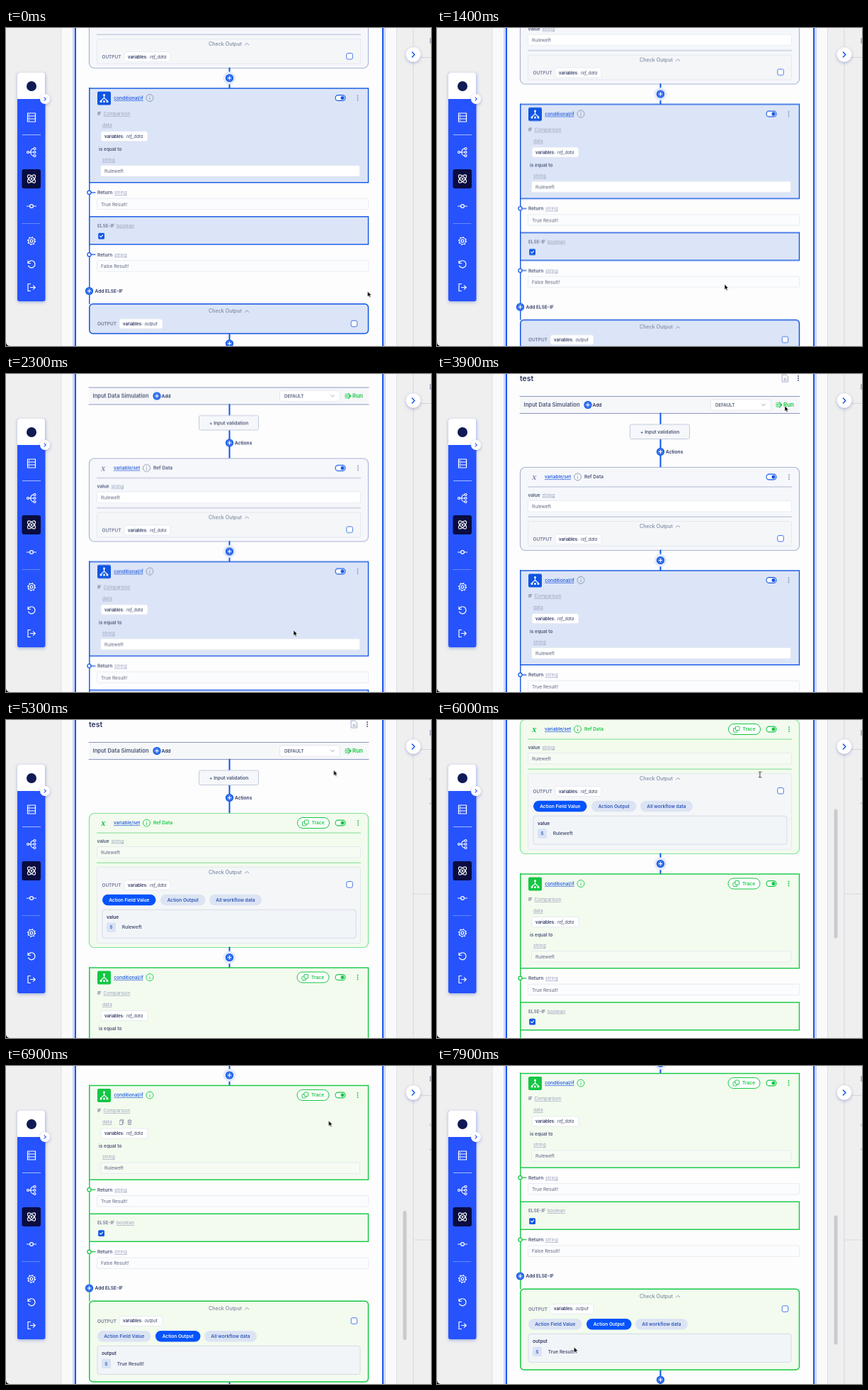
Write an HTML page that moves like this. It is 600x448 px and loops after 8 s.

```html
<!DOCTYPE html>
<html lang="en">
<head>
<meta charset="utf-8">
<title>Workflow run</title>
<style>
html, body { margin: 0; width: 100%; height: 100%; overflow: hidden; background: #efeff0; }
svg { display: block; }
text { font: 400 6.6px Inter, Roboto, sans-serif; fill: #5f6782; white-space: pre; }
.bold { font-weight: 600; fill: #4d5678; }
.dark { font-weight: 600; fill: #2b3560; }
.soft { fill: #98a1bd; text-decoration: underline; }
.link { font-weight: 500; fill: #1450dd; text-decoration: underline; }
.caps { font-size: 6.4px; font-weight: 600; fill: #6d7694; }
.head { font-size: 7.1px; font-weight: 500; fill: #7e88a5; }
.key { font-size: 5.9px; font-weight: 600; fill: #2b3560; }
.ref { font-size: 6px; font-style: italic; fill: #3c4568; }
.white { font-weight: 600; fill: #fff; }
.tab { font-weight: 600; fill: #3159b8; }
.main { font-weight: 600; fill: var(--main); }
.run { font-size: 8px; font-weight: 600; fill: #10c83e; }
.mid { text-anchor: middle; }
.line { fill: none; stroke-linecap: round; stroke-linejoin: round; }
.before { --main: #1055e3; --card: #dce5f7; --edge: #aab5d3; --pale: #f5f7fb; --rule: #a9b3cc; --mute: #8792b2; --field: #fff; }
.after { --main: #14c744; --card: #f2fbee; --edge: #82e297; --pale: #f2fbee; --rule: #72d989; --mute: #14c744; --field: #f6fbf4; }

.flow { animation: scroll 8s infinite; }
.before { animation: before 8s step-end infinite; }
.after, .result { animation: after 8s step-end infinite; }
.hover { animation: hover 8s step-end infinite; }
.thumb { animation: thumb 8s infinite, thumbShow 8s step-end infinite; }
.cursor { animation: cursor 8s infinite; }
.arrow { animation: arrow 8s step-end infinite; }
.beam { animation: beam 8s step-end infinite; }

@keyframes scroll {
  0% { transform: translateY(-179.5px); animation-timing-function: step-end; }
  11.25% { transform: translateY(-179.5px); animation-timing-function: steps(5); }
  17.5% { transform: translateY(-157px); animation-timing-function: steps(3); }
  21.25% { transform: translateY(-108px); animation-timing-function: steps(4); }
  26.25% { transform: translateY(-24px); animation-timing-function: steps(2); }
  28.75% { transform: translateY(0); animation-timing-function: steps(3); }
  32.5% { transform: translateY(12.5px); animation-timing-function: step-end; }
  67.5% { transform: translateY(12.5px); animation-timing-function: steps(6); }
  75% { transform: translateY(-119.5px); animation-timing-function: steps(9); }
  86.25% { transform: translateY(-309px); animation-timing-function: steps(5); }
  92.5%, 100% { transform: translateY(-326px); }
}
@keyframes thumb {
  0%, 67.5% { transform: translateY(72px); animation-timing-function: steps(6); }
  75% { transform: translateY(125.5px); animation-timing-function: steps(9); }
  86.25% { transform: translateY(204px); animation-timing-function: steps(5); }
  92.5%, 100% { transform: translateY(210.5px); }
}
@keyframes thumbShow { 0% { opacity: 0; } 68.75%, 100% { opacity: 1; } }
@keyframes before { 0% { visibility: visible; } 55%, 100% { visibility: hidden; } }
@keyframes after { 0% { visibility: hidden; } 55%, 100% { visibility: visible; } }
@keyframes hover { 0% { opacity: 0; } 83.75% { opacity: 1; } 88.75%, 100% { opacity: 0; } }
@keyframes cursor {
  0% { transform: translate(510.5px, 371px); animation-timing-function: steps(3); }
  3.75% { transform: translate(406px, 361px); animation-timing-function: step-end; }
  33.75% { transform: translate(406px, 361px); animation-timing-function: steps(9); }
  45% { transform: translate(491px, 45px); animation-timing-function: step-end; }
  61.25% { transform: translate(491px, 45px); animation-timing-function: steps(5); }
  67.5% { transform: translate(455.5px, 77px); animation-timing-function: step-end; }
  90% { transform: translate(455.5px, 77px); animation-timing-function: steps(7); }
  98.75%, 100% { transform: translate(193.5px, 396px); }
}
@keyframes arrow { 0% { opacity: 1; } 71.25% { opacity: 0; } 78.75%, 100% { opacity: 1; } }
@keyframes beam { 0% { opacity: 0; } 71.25% { opacity: 1; } 78.75%, 100% { opacity: 0; } }
</style>
</head>
<body>
<svg width="600" height="448" viewBox="0 0 600 448">
  <defs>
    <filter id="shade" x="-50%" y="-50%" width="200%" height="200%">
      <feDropShadow dx="0" dy="1.5" stdDeviation="2" flood-color="#3454a8" flood-opacity=".4"/>
    </filter>
  </defs>
  <rect width="600" height="448" fill="#efeff0"/>
  <rect x="78" width="473.5" height="448" fill="#fafafb"/>
  <path d="M78 0V448M551.5 0V448" stroke="#dedfe4"/>
  <rect x="94" width="442" height="448" fill="#ccd8f8"/>
  <rect x="97" width="436" height="448" fill="#1b57e6"/>
  <rect x="99" width="432" height="448" fill="#fdfdfe"/>
  <path d="M575 0V448M575 41.5H600" stroke="#d5d6da"/>
  <path d="M599 14V22" stroke="#777e93"/>
  <g class="result">
    <path d="M575 245H600" stroke="#d9dade"/>
    <path d="M599 81V85M599 116V119" stroke="#b6bac6"/>
  </g>

  <g class="flow" id="flow"></g>

  <rect class="thumb" x="560.5" width="5" height="182" rx="2.5" fill="#c9cacd"/>
  <g filter="url(#shade)"><circle cx="575" cy="37.5" r="10.3" fill="#fff"/></g>
  <path class="line" d="M573.4 34L576.8 37.5L573.4 41" stroke="#1557e0" stroke-width="1.5"/>

  <g filter="url(#shade)">
    <rect x="16" y="63" width="39.5" height="322" rx="3" fill="#2853fd"/>
    <path d="M16 100V66Q16 63 19 63H52.5Q55.5 63 55.5 66V100Z" fill="#fff"/>
  </g>
  <circle cx="36" cy="82" r="7" fill="#101a55"/>
  <path d="M23 150.5H49" stroke="#a9bbff"/>
  <path d="M23 275.5H49" stroke="#a9bbff" stroke-dasharray="1 1"/>
  <rect x="22.5" y="199" width="26.5" height="27" rx="3" fill="#090c3f"/>
  <g filter="url(#shade)"><circle cx="55" cy="100" r="7" fill="#fff"/></g>
  <path class="line" d="M54 97.8L56.3 100L54 102.2" stroke="#2853fd" stroke-width="1.1"/>
  <g class="line" stroke="#fff" stroke-width="1.2">
    <path d="M30.5 120H41.5V124H30.5ZM30.5 124H41.5V128H30.5ZM30.5 128H41.5V132H30.5ZM32.5 122H33M32.5 126H33M32.5 130H33"/>
    <path d="M32 175H39M34.5 175Q35.5 170 39 170M34.5 175Q35.5 180 39 180"/>
    <circle cx="31" cy="175" r="1.5"/><circle cx="40.5" cy="170" r="1.5"/><circle cx="40.5" cy="175" r="1.5"/><circle cx="40.5" cy="180" r="1.5"/>
    <ellipse cx="36" cy="212.5" rx="7.2" ry="3.2" transform="rotate(45 36 212.5)"/>
    <ellipse cx="36" cy="212.5" rx="7.2" ry="3.2" transform="rotate(-45 36 212.5)"/>
    <circle cx="36" cy="212.5" r=".8"/>
    <path d="M29.5 251H33.5M38.5 251H42.5"/><circle cx="36" cy="251" r="2.4"/>
    <circle cx="36" cy="300" r="1.9"/><circle cx="36" cy="300" r="4.5"/>
    <circle cx="36" cy="300" r="5.4" stroke-width="1.4" stroke-dasharray="1.5 2.74" stroke-linecap="butt"/>
    <path d="M31 328V331.5H34.5M31.2 331.3A5 5 0 1 1 31.5 335"/>
    <path d="M34.5 360.5H31V370.5H34.5M34.5 365.5H41M38.5 362.8L41.2 365.5L38.5 368.2"/>
  </g>
  <path d="M0 443Q.5 447.5 5 448H0Z" fill="#000"/>

  <g class="cursor">
    <path class="arrow" d="M0 0V7.6L1.7 6.1L2.9 8.8L4.2 8.2L3 5.6H5.3Z" fill="#000" stroke="#fff" stroke-width=".5"/>
    <path class="beam line" d="M-1.5 -4Q0 -4 .3 -3Q.6 -4 2.1 -4M.3 -3V3M-1.5 4Q0 4 .3 3Q.6 4 2.1 4" stroke="#222" stroke-width=".9"/>
  </g>
</svg>
<script>
const VALUE = 'Ruleweft';
const GROWTH = 72;   // extra card height once results are shown
const BLUE = '#0f56e4';

// y is the vertical middle of the text
const text = (x, y, s, cls = '') => `<text x="${x}" y="${y + 2.4}" class="${cls}">${s}</text>`;
const rect = (x, y, w, h, fill, stroke = 'none', r = 0, sw = 1) =>
  `<rect x="${x}" y="${y}" width="${w}" height="${h}" rx="${r}" fill="${fill}" stroke="${stroke}" stroke-width="${sw}"/>`;
const path = (d, stroke, sw = 1, extra = '') =>
  `<path class="line" d="${d}" stroke="${stroke}" stroke-width="${sw}" ${extra}/>`;
const circle = (x, y, r, fill, stroke = 'none', sw = 1) =>
  `<circle cx="${x}" cy="${y}" r="${r}" fill="${fill}" stroke="${stroke}" stroke-width="${sw}"/>`;
const move = (y, s) => `<g transform="translate(0 ${y})">${s}</g>`;

const spine = (y1, y2) => path(`M315.5 ${y1}V${y2}`, BLUE, 2, 'stroke-linecap="butt"');
const plus = (x, y, halo = 0) =>
  (halo ? circle(x, y, 9, '#e3eafa') : '') + circle(x, y, 5, '#3f78ee', BLUE, 1.2) +
  path(`M${x - 2.2} ${y}H${x + 2.2}M${x} ${y - 2.2}V${y + 2.2}`, '#fff', 1);
const dots = (x, y, fill = 'var(--mute)') => [-3, 0, 3].map(d => circle(x, y + d, .9, fill)).join('');
const info = (x, y) => circle(x, y, 5, 'none', 'var(--mute)', .9) +
  path(`M${x} ${y}V${y + 2.2}M${x} ${y - 2.3}V${y - 2.1}`, 'var(--mute)', .9);
const toggle = y => rect(465, y - 3.9, 14, 7.8, '#fff', 'var(--main)', 3.9, 1.1) + circle(475, y, 2.5, 'var(--main)');
const field = (x, y, w, s, fill = 'var(--field)') => rect(x, y, w, 15.5, fill, '#e2e7ee', 1.5, .8) + text(x + 5.5, y + 8, s);
const checkbox = (x, y) => rect(x, y, 8.5, 8.5, '#fff', '#4577e8', 2);
const pill = (x, y, w, name) => rect(x, y - 7, w, 14, '#fff', '#e4e8f1', 3, .8) +
  text(x + 5, y - .3, 'variables:', 'key') + text(x + 36, y - .3, name, 'ref');
const checkHead = y => text(309.5, y, 'Check Output', 'head mid') +
  path(`M337.6 ${y + 1.4}L340.2 ${y - 1.2}L342.8 ${y + 1.4}`, '#7e88a5', .9);
const trace = (x, y) => rect(x, y - 7.5, 45, 15, '#fff', 'var(--main)', 7.5) +
  rect(x + 7, y - 1.5, 5.5, 5.5, 'none', 'var(--main)', .5, .9) +
  rect(x + 10, y - 4, 5.5, 5.5, '#fff', 'var(--main)', .5, .9) + text(x + 20, y, 'Trace', 'main');
const branch = (x, y) => rect(x, y, 19, 19, 'var(--main)', 'none', 2) +
  path(`M${x + 9.5} ${y + 6}V${y + 9.5}M${x + 5} ${y + 13}L${x + 9.5} ${y + 9}L${x + 14} ${y + 13}`, '#fff', 1.1) +
  [[9.5, 5], [5, 14], [9.5, 14], [14, 14]].map(([a, b]) => circle(x + a, y + b, 1.5, '#fff')).join('');

function results(x, y, w, active, label, value) {
  const tabs = [['Action Field Value', 0, 75.5], ['Action Output', 82, 63.5], ['All workflow data', 151, 74]];
  return tabs.map(([s, dx, tw], i) =>
    rect(x + dx, y - 7.7, tw, 15.4, i === active ? '#0553fb' : '#dce4f4', 'none', 7.7) +
    text(x + dx + tw / 2, y, s, (i === active ? 'white' : 'tab') + ' mid')).join('') +
    rect(x, y + 13.7, w, 40, '#f2f5f8', '#d5dbe6', 3) +
    text(x + 6, y + 24, label, 'dark') +
    rect(x + 6, y + 31.7, 13, 13.5, '#dae3f5', 'none', 2) + text(x + 12.5, y + 38.4, 'S', 'tab mid') +
    text(x + 27.7, y + 38.4, value, 'bold');
}

const header = () =>
  `<text x="117" y="-2.7" class="dark" style="font-size:10.5px">test</text>` +
  path('M487.5 -11.5H492.5L495.5 -8.5V-1.5H487.5ZM490 -3.5V-5.5M491.5 -3.5V-7M493.3 -3.5V-5', '#98a2bd', .9) +
  dots(510, -6.5, '#3d466b') +
  rect(117, 19, 395, 24, '#f6f7f9') + path('M117 19H512M117 43H512', '#8997be', 1) +
  `<text x="122.5" y="33.8" class="bold" style="font-size:7.7px">Input Data Simulation</text>` +
  plus(213, 31) + text(219.5, 31, 'Add', 'dark') +
  rect(386.5, 23.3, 85, 15.4, '#fff', '#dfe3ec', 2.5, .8) +
  `<text x="393" y="33.2" class="bold" style="font-size:6.2px">DEFAULT</text>` +
  path('M458.5 29.7L461 32.2L463.5 29.7', '#8d97b2', .9) +
  path('M479 28.5H483M478.5 31H483M479 33.5H483M483.5 27.5L486.8 31L483.5 34.5M483 31H486', '#10c83e', 1.1) +
  `<text x="489" y="33.8" class="run">Run</text>` +
  spine(43, 119) +
  rect(272.5, 58.5, 84, 20.5, '#f5f7fa', '#c4cbdc', 2) + text(314.7, 69, '+ Input validation', 'bold mid') +
  plus(315.5, 97) + text(323, 97, 'Actions', 'dark');

const variableCard = done =>
  rect(117.5, 119, 394, 117 + (done ? GROWTH : 0), 'var(--pale)', 'var(--edge)', 7, 1.2) +
  `<text x="134" y="136" style="font:italic 800 11px 'Noto Serif',serif;fill:var(--mute)">x</text>` +
  text(152, 132.5, 'variable/set', 'link') + info(198.5, 132.5) +
  text(208, 132.5, 'Ref Data', done ? 'main' : 'bold') + (done ? trace(411.5, 132.5) : '') +
  toggle(132.5) + dots(497, 132.5) +
  path('M128.5 146.5H500.5M128.5 188.7H500.5', 'var(--rule)', .9) +
  text(128.5, 157.7, 'value', 'bold') + text(148.5, 157.7, 'string', 'soft') +
  field(128.5, 166, 372, VALUE) +
  rect(128.5, 195, 372, 35 + (done ? GROWTH : 0), '#f4f6f8', '#e1e5ec', 2, .8) +
  checkHead(202) + text(135.5, 220, 'OUTPUT', 'caps') + pill(167, 220, 65, 'ref_data') + checkbox(480.8, 215) +
  (done ? results(136, 241, 358, 0, 'value', VALUE) : '');

const returns = (y, s) =>
  path(`M120 ${y}H126`, 'var(--main)', 1.2) + circle(117.5, y, 2.6, '#fff', 'var(--main)', 1.2) +
  text(129, y, 'Return', 'bold') + text(153, y, 'string', 'soft') + field(128.5, y + 8.3, 383, s, '#fbfcfd');

const conditionCard = done =>
  spine(-28, 0) + plus(315.5, -14, 1) +
  path('M117.8 0V304', 'var(--main)', 1.4) +
  rect(117.8, .5, 393.7, 132.7, 'var(--card)', 'var(--main)', 0, 1.4) +
  branch(129, 5) + text(152.3, 14, 'conditional/if', 'link') + info(203, 14) +
  (done ? trace(411, 14) : '') + toggle(14) + dots(496.5, 14) +
  text(129, 36, 'IF', 'caps') + text(137.5, 36, 'Comparison', 'soft') +
  text(136, 52, 'data', 'soft') +
  (done ? `<g class="hover">${path('M160.5 50H164.5V55.5H160.5ZM161.5 48.7H165.7V54M172 50H177M172.7 50V55.5H176.3V50M173.8 48.7H175.2M174.5 51.5V54', '#7d879f', .8)}</g>` : '') +
  pill(134, 68, 66, 'ref_data') + text(131, 86, 'is equal to', 'bold') +
  text(136, 101, 'string', 'soft') + field(133.5, 109, 366, VALUE) +
  returns(147.3, 'True Result!') +
  rect(117.8, 181.3, 393.7, 39, 'var(--card)', 'var(--main)', 0, 1.4) +
  text(129, 193.7, 'ELSE-IF', 'caps') + text(156, 193.7, 'boolean', 'soft') +
  rect(130.2, 204.2, 8.8, 8.8, BLUE, 'none', 1.5) + path('M132.5 208.7L134 210.2L136.7 207.2', '#fff', 1.1) +
  returns(234.7, 'False Result!') +
  plus(117.5, 286) + text(125.5, 286, 'Add ELSE-IF', 'dark');

const outputCard = done => {
  const bottom = done ? 418 : 346;
  return spine(bottom, bottom + 60) + plus(315.5, bottom + 14) +
    rect(117.8, 304.3, 393.7, bottom - 304.3, 'var(--card)', 'var(--main)', 5, 1.5) +
    checkHead(314.5) + text(129, 332.3, 'OUTPUT', 'caps') + pill(160, 332.3, 61, 'output').replace('x="196"', 'x="195.5"') +
    checkbox(487.2, 327.8) + (done ? results(129, 353.7, 371, 1, 'output', 'True Result!') : '');
};

const flow = done => `<g class="${done ? 'after' : 'before'}">` + header() + variableCard(done) +
  move(264 + (done ? GROWTH : 0), conditionCard(done) + outputCard(done)) + '</g>';

document.getElementById('flow').innerHTML = flow(false) + flow(true);
</script>
</body>
</html>
```
